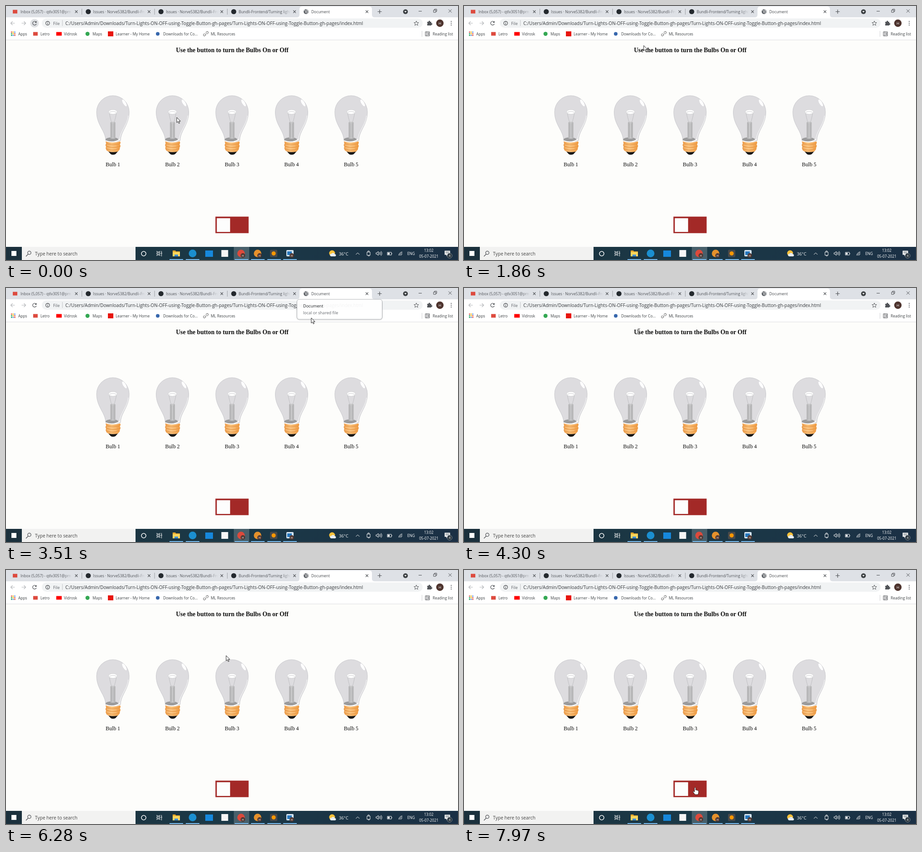
These frames come from a looping animation (998 by 561 pixels, 8 s). An HTML page:

```html
<!DOCTYPE html>
<html lang="en">
<head>
<meta charset="utf-8">
<title>Bulbs</title>
<style>
  html, body { margin: 0; width: 100%; height: 100%; overflow: hidden; background: #fdfdfb; }
  svg { display: block; width: 100%; height: 100%; }
  text { font-family: "Open Sans", "Noto Sans", sans-serif; white-space: pre; }
  .page, .page text { font-family: "Liberation Serif", serif; }
  .line { fill: none; stroke: #4a4d51; stroke-width: 1.2; }
  .tray { fill: none; stroke: #f4f4f4; stroke-width: 1; }
</style>
</head>
<body>
<svg id="stage" viewBox="0 0 998 561"></svg>
<script>
const LOOP = 8000;
const HEADING = 'Use the button to turn the Bulbs On or Off';

const rect = (x, y, w, h, fill, more = '') =>
  `<rect x="${x}" y="${y}" width="${w}" height="${h}" fill="${fill}" ${more}/>`;
const circle = (x, y, r, fill, more = '') => `<circle cx="${x}" cy="${y}" r="${r}" fill="${fill}" ${more}/>`;
const path = (d, more = 'class="line"') => `<path d="${d}" ${more}/>`;
const text = (x, y, size, fill, content, more = '') =>
  `<text x="${x}" y="${y}" font-size="${size}" fill="${fill}" ${more}>${content}</text>`;
const cross = (x, y, r = 2.8) => path(`M${x - r} ${y - r}l${2 * r} ${2 * r}m0 ${-2 * r}l${-2 * r} ${2 * r}`);

const defs = `<defs>
  <linearGradient id="fade"><stop stop-color="#dee1e6" stop-opacity="0"/><stop offset="1" stop-color="#dee1e6"/></linearGradient>
  <linearGradient id="taskbar"><stop stop-color="#1b303c"/><stop offset=".5" stop-color="#1b3947"/><stop offset="1" stop-color="#1b3045"/></linearGradient>
  <linearGradient id="brass"><stop stop-color="#ec9a48"/><stop offset=".4" stop-color="#fac27c"/><stop offset="1" stop-color="#f09a40"/></linearGradient>
  <linearGradient id="stem"><stop stop-color="#b0b0b1"/><stop offset=".5" stop-color="#cdcdce"/><stop offset="1" stop-color="#b0b0b1"/></linearGradient>
  <clipPath id="selected"><rect id="selectedArea" x="375" y="89" width="0" height="16"/></clipPath>
  <g id="bulb">
    <path d="M-16 297C-16 276-36 263-36 234A36 36 0 0 1 36 234C36 263 17 276 17 297Q0 303-16 297Z" fill="#dddcdf" stroke="#c6c6ca" stroke-width=".9"/>
    <path d="M15 296C15 278 33 262 34 242" fill="none" stroke="#f4f4f5" stroke-width="1.3"/>
    <ellipse cx="25.500" cy="214" rx="3" ry="8.500" fill="#fff" transform="rotate(-31 25.500 214)"/>
    <path d="M-8 236Q-6 247-3 257M8 236Q6 247 3 257" fill="none" stroke="#b4b4b7" stroke-width=".7"/>
    <ellipse cx="0" cy="234" rx="9.500" ry="5" fill="#fff" stroke="#c4c4c7" stroke-width=".6"/>
    <path d="M-8 235Q0 231 8 235" fill="none" stroke="#b6b6b9" stroke-width=".7"/>
    <ellipse cx="-2" cy="295" rx="14" ry="4.800" fill="#9b9b9c"/>
    <path d="M-5.500 257Q0 254 5.500 257V293H-5.500Z" fill="url(#stem)"/>
    <path d="M-2 259V291M2 259V291" stroke="#a5a5a8" stroke-width=".8"/>
    <path d="M-15 298Q2 304 16 294" fill="none" stroke="#fff" stroke-width="2"/>
    <path d="M-11 320H12L6 327Q0 330-5 327Z" fill="#191817"/>
    <path d="M-16 299Q0 304 16 299L17 302 15.500 306 17 309 15.500 313 15 317 11 321.500Q0 324-10 321.500L-14 319-16 314-15 311-16.500 307-15 304Z" fill="url(#brass)"/>
    <path d="M-15 304Q0 309 16 304M-15 310Q0 315 16 310M-15 316Q0 321 15 315" fill="none" stroke="#e29547" stroke-width="1"/>
    <path d="M-13 307Q-3 311 8 309M-13 313Q-3 317 8 315" fill="none" stroke="#fccf94" stroke-width=".9"/>
  </g>
</defs>`;

function tabs() {
  const titles = ['Inbox (5,057) - qtlv3051@prn', 'Issues · Norve5382/Bundli-Front',
    'Issues · Norve5382/Bundli-Front', 'Bundli-Frontend/Turning lights'];
  const inactive = titles.map((title, i) => {
    const x = 32 + i * 160.6;
    const icon = i ? circle(x - 11, 12.5, 5.6, '#24292e') : rect(15, 8.5, 10, 8, '#dd4b3f');
    return `<svg x="${x}" y="0" width="114" height="25">${text(0, 15.5, 8.35, '#505358', title)}</svg>` +
      rect(x + 95, 3, 20, 20, 'url(#fade)') + icon + cross(x + 123.3, 12.5) +
      (i < 3 ? rect(x + 135, 6, 1, 13, '#9a9da2') : '');
  }).join('');
  return rect(0, 0, 998, 25, '#dee1e6') + inactive +
    path('M642 25Q648 25 648 19V7Q648 1 654 1H802Q808 1 808 7V19Q808 25 814 25Z', 'fill="#fff"') +
    circle(662.5, 12.5, 5.3, '#5f6368') +
    path('M659 10l3 1 1 2-2 2M664 8l1 3 2 1M664 16l2-2', 'fill="none" stroke="#fff" stroke-width="1.1"') +
    text(674, 15.5, 8.4, '#45484c', 'Document') + cross(797, 12.5) +
    path('M820.500 12.500h9m-4.500-4.500v9') +
    circle(882, 12.5, 5.3, '#3c4043') + path('M879.500 11h5l-2.500 3.500z', 'fill="#fff"') +
    path('M911 11.500h7M944 9h5v5h-5zM946 9V7h5v5h-2M977 7.500l7 7m0-7l-7 7', 'class="line" style="stroke-width:1"');
}

function toolbar() {
  const arrow = (x, d, color) => path(`M${x - 4.5 * d} 38h${9 * d}m${-4 * d}-4l${4 * d} 4l${-4 * d} 4`,
    `fill="none" stroke="${color}" stroke-width="1.2"`);
  return rect(0, 25, 998, 50, '#fff') + rect(0, 74.5, 998, 1, '#dcdedf') +
    arrow(15, -1, '#b4b6b9') + arrow(39, 1, '#b4b6b9') +
    '<circle id="reloadHover" cx="63" cy="38" r="9.500" fill="#dfe1e4"/>' +
    path('M66.500 35.500A4.200 4.200 0 1 0 67 39.500') + path('M67.500 33v4h-4z', 'fill="#4a4d51"') +
    rect(79, 27.5, 841, 20.5, '#f1f3f4', 'rx="10.250"') +
    circle(92, 38, 4.2, 'none', 'class="line"') + path('M92 37.500v3M92 35v1.200') +
    text(104, 41.5, 9.2, '#5f6368', 'File') + rect(124, 31, 1, 13, '#c4c7ca') +
    text(131, 41.5, 10, '#35383c', 'C:/Users/Admin/Downloads/' +
      'Turn-Lights-ON-OFF-using-Toggle-Button-gh-pages/'.repeat(2) + 'index.html') +
    path('M906 33l1.400 3.500 3.800.2-2.900 2.400 1 3.700-3.300-2.100-3.300 2.100 1-3.700-2.900-2.400 3.800-.2z', 'class="line" style="stroke-width:.9"') +
    path('M930 35h3a1.800 1.800 0 1 1 3.400 0H939v3a1.800 1.800 0 1 1 0 3.400V43h-9v-3a1.800 1.800 0 0 0 0-3z', 'fill="#505357"') +
    circle(958, 38, 8.2, '#4e342e') + text(958, 41, 8, '#fff', 'H', 'text-anchor="middle"') +
    [34, 38, 42].map(y => circle(983, y, 1.1, '#505357')).join('');
}

function bookmarks() {
  const items = [[27, 'Apps'], [76, 'Letro'], [128, 'Vidrosk'], [191, 'Maps'], [242, 'Learner - My Home'],
    [347, 'Downloads for Co...'], [452, 'ML Resources'], [942, 'Reading list']];
  const colors = ['#d94235', '#4285f4', '#f3b400', '#0f9d58'];
  let grid = '';
  for (let i = 0; i < 9; i++)
    grid += rect(11 + i % 3 * 3.6, 56.5 + Math.floor(i / 3) * 3.6, 2.4, 2.4, colors[(i * 2 + (i >> 1)) % 4]);
  return grid + items.map(([x, label]) => text(x, 64.7, 8.4, '#3c4043', label)).join('') +
    rect(60, 57.5, 10, 8, '#dd4b3f') + rect(111, 57.5, 12, 8, '#f00') + circle(180, 61.5, 4.5, '#34a853') +
    rect(225, 56, 12, 11, '#e8150e') + circle(335, 61.5, 4, '#3767ad') +
    path('M439.500 63.500l3.500-3.500M438.500 60.500l-2 2a2 2 0 0 0 3 3l2-2M441 59l2-2a2 2 0 0 1 3 3l-2 2', 'class="line" style="stroke:#888"') +
    rect(918, 55, 1, 13, '#d0d2d4') + path('M926 57h9v9h-9zM929 57v9M931 59.500h3m-3 2h3m-3 2h3', 'class="line" style="stroke-width:1"');
}

function page() {
  const heading = (fill, more = '') => text(499.5, 101.5, 13.68, fill, HEADING,
    `font-weight="bold" text-anchor="middle" ${more}`);
  let bulbs = '';
  for (let i = 0; i < 5; i++) {
    const x = 236 + i * 131.5;
    bulbs += `<use href="#bulb" x="${x}"/>` + text(x, 354, 11.9, '#0b0b0b', `Bulb ${i + 1}`, 'text-anchor="middle"');
  }
  return `<g class="page">${heading('#0b0b0b')}
    <g clip-path="url(#selected)">${rect(375, 89, 250, 16, '#3390f6')}${heading('#fff')}</g>${bulbs}
    ${rect(462.4, 465.2, 73.3, 36.5, '#a32927')}${rect(465.5, 468.7, 29.3, 30.3, '#fdfdfd')}</g>`;
}

function taskbar() {
  const badge = x => circle(x, 551, 5, '#4e342e') + text(x, 553.5, 6.5, '#fff', 'H', 'text-anchor="middle"');
  const running = [361, 397, 505, 541, 577, 612].map(x => rect(x, 559, 30, 2, '#76b9ed')).join('');
  return rect(0, 532, 998, 29, 'url(#taskbar)') + rect(12, 541, 11, 11, '#fff') +
    rect(35, 532, 251, 29, '#f2f2f1') + circle(51.5, 545, 3.7, 'none', 'class="line"') + path('M49 548l-5 5') +
    text(64, 550.5, 10.25, '#444', 'Type here to search') +
    circle(304, 547, 5, 'none', 'stroke="#fff" stroke-width="1.500"') +
    path('M333 541v2h7v-2M333 552v-2h7v2M333 545h7v3h-7zM343.500 541v12M342 546h3', 'class="tray"') +
    rect(503, 532, 34, 29, '#48606b') + running +
    path('M368 540h6l1 2h9v11h-16z', 'fill="#e9a92b"') + rect(368, 543.5, 16, 9.5, '#ffd75e') + rect(372, 549, 8, 4, '#3f8fd4') +
    circle(412, 546.5, 8.5, '#1b8fd0') + rect(440, 540, 17, 14, '#1688dc') +
    rect(475.5, 539, 15, 15, '#f6f6f6') +
    circle(519, 546.5, 8.3, '#dc4a3c') + badge(523) + circle(555.5, 546.5, 8.3, '#e5912c') + badge(560) +
    rect(583, 538.5, 16, 16, '#4a4a4a', 'rx="2"') + circle(591, 546.5, 4.5, '#ff9800') +
    rect(619, 539, 16, 14, '#d4e5f4', 'rx="2"') + rect(621, 542, 10, 8, '#2777bd') + badge(631) +
    circle(720, 546, 6.5, '#f8c13a') + path('M718 553a3 3 0 0 1 1-6 4 4 0 0 1 7 1 2.600 2.600 0 0 1 1 5z', 'fill="#e5edf4"') +
    text(735, 550.5, 9.5, '#fff', '36°C') +
    path('M772.500 549l4-4 4 4M797 543.500h7v7h-7zM799 543v-2h3v2M799 552h4M817 545h2l3-3v9l-3-3h-2zM824 544q2 2.500 0 5M826 543q3 3.500 0 7M828 541.500q4 5 0 10M842 544h9v6h-9zM852 546v2', 'class="tray"') +
    rect(843, 545, 4, 4, '#fff') +
    path('M867 551a9 9 0 0 1 8-8M869.500 551a6 6 0 0 1 5.500-5.500M872 551a3 3 0 0 1 3-3', 'class="tray"') +
    text(886, 550, 8.3, '#fff', 'ENG') +
    text(933.5, 542.5, 8.1, '#fff', '13:02', 'text-anchor="middle"') +
    text(933.5, 556, 8.2, '#fff', '05-07-2021', 'text-anchor="middle"') +
    path('M968.500 540.500h12v9h-5l-3 3v-3h-4z', 'fill="#f5f5f5"') +
    path('M970.500 543h8m-8 2.500h8', 'stroke="#30434d" stroke-width=".8"') +
    circle(979.5, 551.5, 5.5, '#28343d', 'stroke="#aab2b7" stroke-width=".7"') +
    text(979.5, 554.3, 7.5, '#fff', '4', 'text-anchor="middle"');
}

const tooltip = `<g id="tooltip">
  ${rect(642, 26, 189, 44.5, 'none', 'rx="6" stroke="#777" stroke-opacity=".3" stroke-width="1.500"')}
  ${rect(642.5, 25, 188, 44, '#fff', 'rx="5" fill-opacity=".94" stroke="#b5b8bb" stroke-width="1"')}
  ${text(656, 43, 9.1, '#202326', 'Document')}${text(656, 57.7, 9.05, '#65696e', 'local or shared file')}</g>`;

const pointers = `<g id="pointer" stroke-linejoin="round">
  <path id="arrow" d="M0 0V11.500L2.700 9 4.600 13.300 6.500 12.500 4.700 8.400H8.200Z" fill="#fff" stroke="#111" stroke-width=".9"/>
  <path id="beam" d="M-2.500-6H-1L0-5 1-6H2.500M0-5V5M-2.500 6H-1L0 5 1 6H2.500" fill="none" stroke="#222" stroke-width="1"/>
  <path id="hand" d="M0 1.200Q1.300-.8 2.600 1.200V6Q4 5 5 6.600 6.500 5.800 7.100 7.300 8.600 7 8.900 8.500V12L7.500 16H1L-3 10.500Q-3.600 8.500-1.700 8.800L0 10.300Z" fill="#fff" stroke="#111" stroke-width=".8"/>
</g>`;

document.getElementById('stage').innerHTML = defs + rect(0, 0, 998, 561, '#fdfdfb') +
  tabs() + toolbar() + bookmarks() + page() + taskbar() + tooltip + pointers;

// Pointer stops: time, x, y
const route = [[0, 377, 246], [1070, 205, 138], [1400, 205, 138], [2450, 674, 14], [3200, 674, 14],
  [3510, 674, 66], [4400, 376, 97], [4650, 376, 97], [5341, 625, 94], [5600, 625, 94],
  [6280, 486, 189], [7400, 509, 480], [LOOP, 509, 480]];

const clamp = v => Math.min(1, Math.max(0, v));
const ramp = (t, from, to) => clamp((t - from) / (to - from));

function pointerAt(t) {
  const i = Math.max(1, route.findIndex(stop => stop[0] >= t));
  const [t0, x0, y0] = route[i - 1], [t1, x1, y1] = route[i];
  const u = ramp(t, t0, t1), eased = u * u * (3 - 2 * u);
  return [x0 + (x1 - x0) * eased, y0 + (y1 - y0) * eased];
}

const byId = id => document.getElementById(id);
const inside = (x, y, left, top, right, bottom) => x >= left && x <= right && y >= top && y <= bottom;

function draw(t) {
  const [x, y] = pointerAt(t);
  const shape = inside(x, y, 375, 89, 625, 106) ? 'beam' : inside(x, y, 462, 465, 536, 502) ? 'hand' : 'arrow';
  for (const id of ['arrow', 'beam', 'hand']) byId(id).style.display = id === shape ? '' : 'none';
  byId('pointer').setAttribute('transform', `translate(${x.toFixed(1)} ${y.toFixed(1)})`);

  // The selection trails the dragging pointer slightly.
  const dragging = t > 4700 && t < 5700;
  const edge = pointerAt(Math.min(t - 50, 5341))[0];
  byId('selectedArea').setAttribute('width', dragging ? Math.max(0, edge - 375) : 0);

  byId('tooltip').style.opacity = ramp(t, 2900, 3050) * (1 - ramp(t, 3550, 3700));
  byId('reloadHover').style.opacity = 1 - ramp(t, 40, 240);
}

function tick() {
  draw(performance.now() % LOOP);
  requestAnimationFrame(tick);
}
tick();
</script>
</body>
</html>
```
